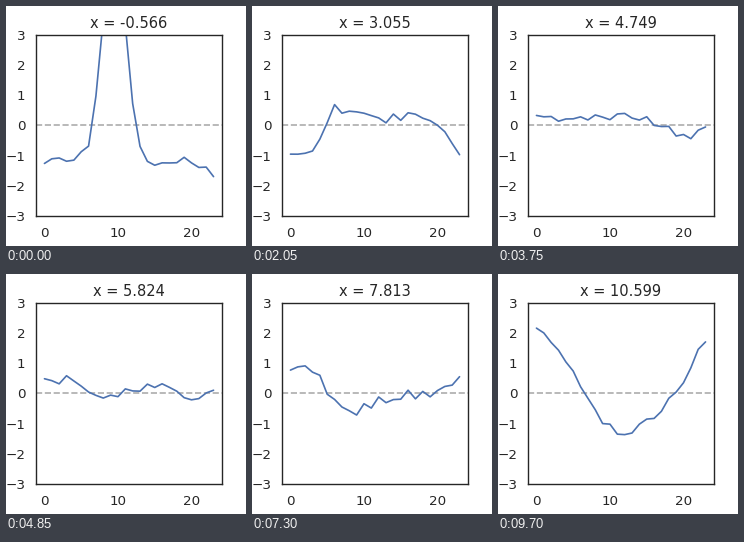
Animation, 240 px wide and 240 px high, one loop 9.75 s. Source, as a matplotlib script:

```python
import numpy as np
import matplotlib.pyplot as plt
from matplotlib.animation import FuncAnimation

DPI = 80
FRAMES = 195
INTERVAL = 50
HOURS = np.arange(24)
KEY_HOURS = [0, 3, 6, 9, 12, 16, 20, 23]
JITTER = 0.16
INK = "0.15"

plt.rcParams["font.family"] = "DejaVu Sans"


def shape(*levels):
    """Daily profile through a few levels at the key hours."""
    return np.interp(HOURS, KEY_HOURS, levels)


# Frame, x value, rough profile
POSES = [
    (0, -0.566, shape(-1.3, -1.1, -1.1, -1.2, -1.2, -1.4, -1.15, -1.55)),
    (41, 3.055, shape(-1.05, -0.8, 0.65, 0.3, 0.15, 0.3, 0.1, -0.85)),
    (75, 4.749, shape(0.3, 0.2, 0.35, 0.15, 0.4, 0.05, -0.4, -0.15)),
    (118, 6.851, shape(0.5, 0.65, -0.45, -0.35, 0.05, 0.45, -0.25, 0.1)),
    (146, 7.813, shape(0.8, 0.8, -0.25, -0.6, -0.25, -0.05, -0.05, 0.55)),
    (168, 9.419, shape(1.55, 1.2, -0.6, -0.85, -0.4, -0.05, 0, 0.85)),
    (194, 10.599, shape(2.05, 1.55, 0.25, -1.05, -1.3, -0.75, 0.45, 1.75)),
]


def build_profiles():
    """Blend the poses and roughen every profile with its own jitter."""
    rng = np.random.default_rng(7)
    xs = np.zeros(FRAMES)
    curves = rng.uniform(-JITTER, JITTER, (FRAMES, 24))
    peak = 7.35 * np.exp(-((HOURS - 9.5) ** 2) / 4.8)
    frames = [p[0] for p in POSES]
    for n in range(FRAMES):
        i = min(np.searchsorted(frames, n, side="right"), len(POSES) - 1)
        (a, xa, ca), (b, xb, cb) = POSES[i - 1:i + 1]
        t = (n - a) / (b - a)
        if i == 1:
            t = 1 - (1 - t) ** 2  # the morning peak fades quickly
            curves[n] += peak * (1 - t)
        xs[n] = xa + (xb - xa) * t
        curves[n] += ca + (cb - ca) * t
    return xs, curves


xs, curves = build_profiles()

fig = plt.figure(figsize=(3, 3), dpi=DPI, facecolor="white")
ax = fig.add_axes([0.125, 0.125, 0.775, 0.755])
ax.axhline(0, color="0.68", lw=1.5, ls="--", zorder=1)
line, = ax.plot(HOURS, curves[0], color="#4C72B0", lw=1.5,
                solid_capstyle="round", zorder=2)
ax.set_xlim(-1.15, 24.15)
ax.set_ylim(-3, 3)
ax.set_xticks([0, 10, 20])
ax.set_yticks(range(-3, 4))
ax.tick_params(length=0, pad=9.5, labelsize=12.1, labelcolor=INK)
for spine in ax.spines.values():
    spine.set(color=INK, linewidth=1.25)
title = ax.set_title("", fontsize=13.2, color=INK, pad=6)


def draw(n):
    line.set_ydata(curves[n])
    title.set_text(f"x = {xs[n]:.3f}")
    return line, title


anim = FuncAnimation(fig, draw, frames=FRAMES, interval=INTERVAL,
                     repeat=True, repeat_delay=0, blit=False)
plt.show()
```
